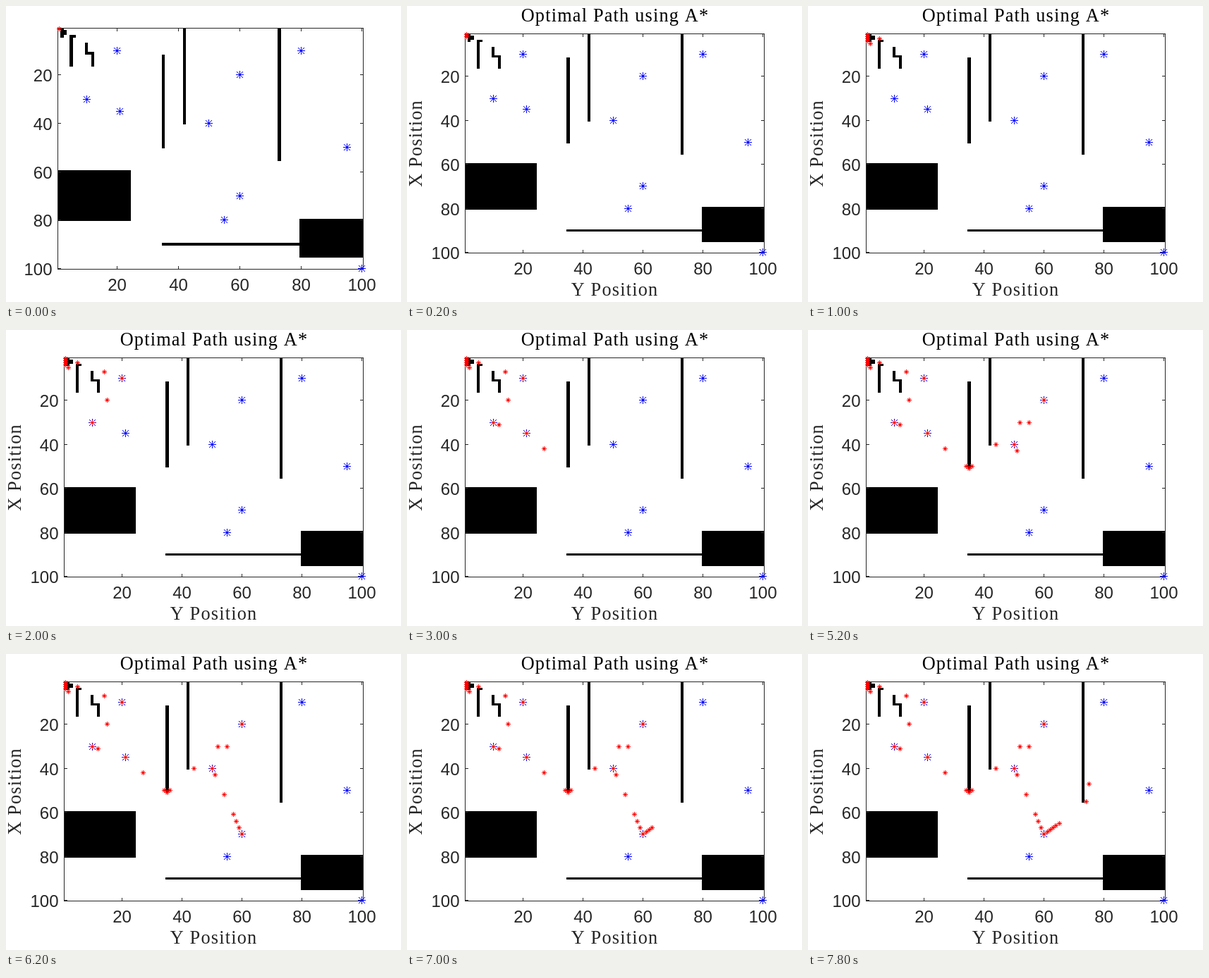
An HTML page with a canvas for the animation above (8 s loop, 560 by 420 pixels).

```html
<!DOCTYPE html>
<html lang="en">
<head>
<meta charset="utf-8">
<style>
  html, body { margin: 0; width: 100%; height: 100%; overflow: hidden; background: #fff; }
  canvas { display: block; }
</style>
</head>
<body>
<canvas id="stage" width="560" height="420"></canvas>
<script>
const ctx = document.getElementById('stage').getContext('2d');
const LOOP = 8000, STEP = 200, CELLS = 100;
const INK = '#262626';
const SANS = '24px "Liberation Sans", sans-serif';
const SERIF = '26.3px "Liberation Serif", serif';

// Plot area in pixels, before and after the labels appear
const BARE = { left: 73, top: 31, w: 434, h: 343 };
const LABELLED = { left: 82, top: 39, w: 425, h: 312 };

// Each leg bends at [column, row, steps to get there] and ends on a goal
const START = [1, 1];
const LEGS = [
  [[1, 4, 3], [2, 5], [5, 3], [14, 7], [20, 10]],
  [[10, 30, 2]],
  [[12, 31], [21, 35]],
  [[34, 50, 2], [35, 51], [36, 50], [60, 20, 3]],
  [[50, 40, 2]],
  [[51, 43], [57, 61, 2], [60, 70, 3]],
  [[65, 65, 5], [74, 55], [75, 47], [80, 10]]
];
const GOALS = [...LEGS.map(leg => leg.at(-1)), [95, 50], [55, 80], [100, 100]];
const route = planRoute();

// One cell per step; every leg starts again from the goal just reached
function planRoute() {
  const cells = [START];
  for (const leg of LEGS) {
    for (const [col, row, steps = 1] of leg) {
      const [c, r] = cells.at(-1);
      for (let i = 1; i <= steps; i++) {
        cells.push([c + (col - c) * i / steps, r + (row - r) * i / steps].map(Math.floor));
      }
    }
    cells.push(cells.at(-1));
  }
  return cells;
}

function drawWalls(px, py) {
  const snap = v => Math.ceil(v - 0.5);
  const block = (c1, r1, c2, r2) => {
    const x = snap(px(c1 - 0.5)), y = snap(py(r1 - 0.5));
    ctx.fillRect(x, y, snap(px(c2 + 0.5)) - x, snap(py(r2 + 0.5)) - y);
  };
  const column = (col, from, to) => block(col, from, col, to);
  const row = (r, from, to) => block(from, r, to, r);

  ctx.fillStyle = '#000';
  column(2, 1, 4);
  column(3, 2, 3);
  column(5, 4, 16);
  row(4, 5, 6);
  column(10, 7, 11);
  row(11, 10, 12);
  column(12, 11, 16);
  column(35, 12, 50);
  column(42, 1, 40);
  column(73, 1, 55);
  row(90, 35, 80);
  block(1, 60, 24, 80);
  block(80, 80, 100, 95);
}

// Pixel asterisk: a cross with slightly shorter diagonals
function star(x, y, color, arm) {
  ctx.fillStyle = color;
  ctx.fillRect(x - arm, y, 2 * arm + 1, 1);
  ctx.fillRect(x, y - arm, 1, 2 * arm + 1);
  for (let i = 1 - arm; i < arm; i++) {
    ctx.fillRect(x + i, y + i, 1, 1);
    ctx.fillRect(x + i, y - i, 1, 1);
  }
}

function text(str, x, y, align, color = INK) {
  ctx.fillStyle = color;
  ctx.textAlign = align;
  ctx.fillText(str, x, y);
}

function drawAxes({ left, top, w, h }, px, py) {
  const right = left + w - 1, bottom = top + h - 1, tick = 5;
  ctx.strokeStyle = INK;
  ctx.strokeRect(left + 0.5, top + 0.5, w - 1, h - 1);
  ctx.font = SANS;
  ctx.letterSpacing = '0px';
  ctx.fillStyle = INK;
  for (let v = 20; v <= CELLS; v += 20) {
    const x = Math.floor(px(v)), y = Math.floor(py(v));
    ctx.fillRect(x, top, 1, tick);
    ctx.fillRect(x, bottom - tick + 1, 1, tick);
    ctx.fillRect(left, y, tick, 1);
    ctx.fillRect(right - tick + 1, y, tick, 1);
    text(v, x + 0.5, bottom + 31, 'center');
    text(v, left - 7.5, y + 9.5, 'right');
  }
}

function drawTitles() {
  ctx.font = SERIF;
  ctx.letterSpacing = '0.045em';
  text('Optimal Path using A*', 295, 22, 'center', '#000');
  text('Y Position', 294.5, 411, 'center');
  ctx.save();
  ctx.translate(21, 195);
  ctx.rotate(-Math.PI / 2);
  text('X Position', 0, 0, 'center');
  ctx.restore();
}

function draw(step) {
  const view = step ? LABELLED : BARE;
  const px = col => view.left + (col - 0.5) * view.w / CELLS;
  const py = row => view.top + (row - 0.5) * view.h / CELLS;
  const mark = (cells, color, arm) => cells.forEach(([col, row]) =>
    star(Math.floor(px(col)), Math.floor(py(row)), color, arm));

  ctx.fillStyle = '#fff';
  ctx.fillRect(0, 0, 560, 420);
  drawWalls(px, py);
  drawAxes(view, px, py);
  mark(GOALS, '#00f', 5);
  mark(route.slice(0, step + 1), '#f00', 3);
  if (step) drawTitles();
}

function frame() {
  draw(Math.floor(performance.now() % LOOP / STEP));
  requestAnimationFrame(frame);
}
frame();
</script>
</body>
</html>
```
